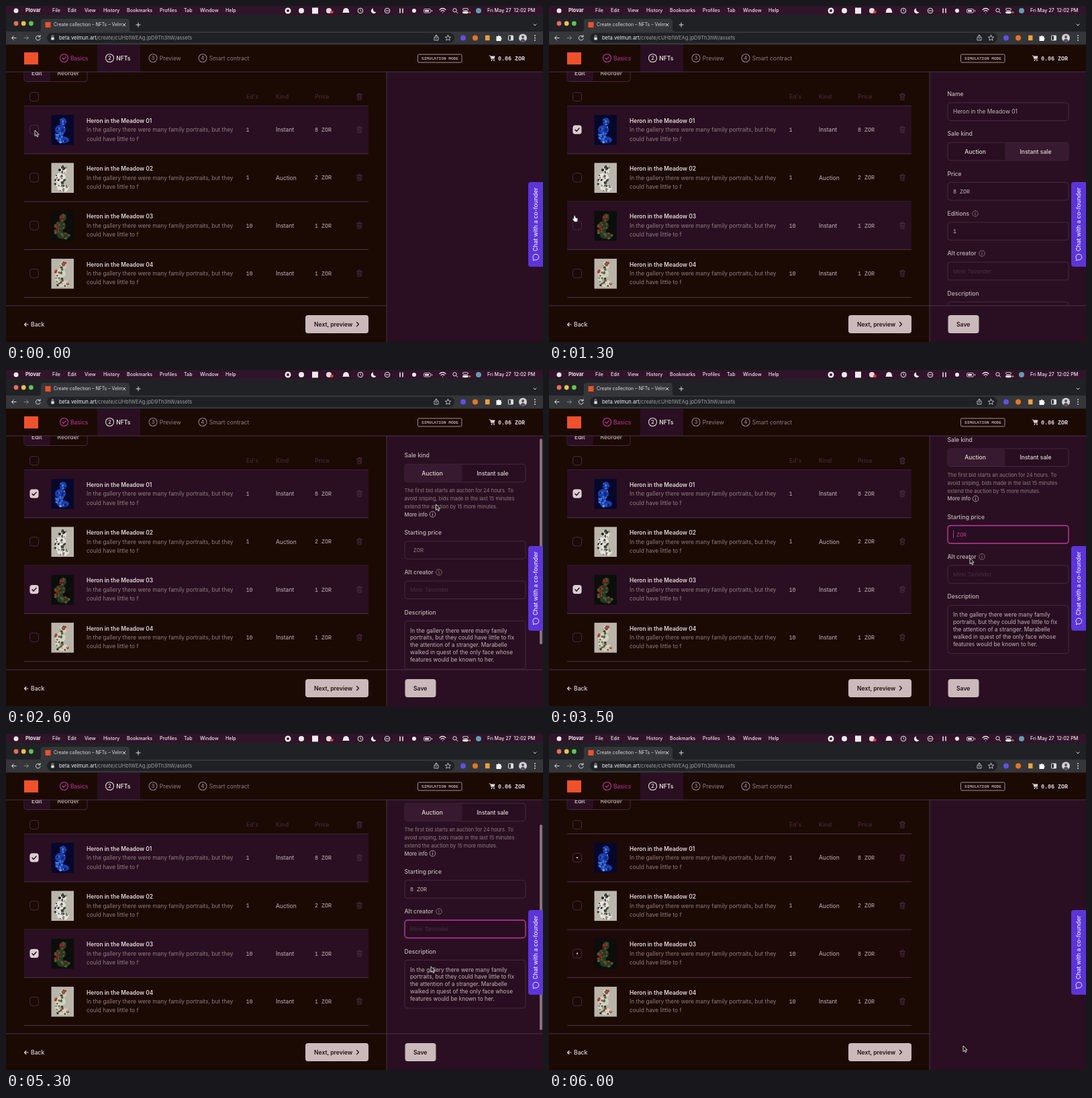
An HTML page that plays this animation: 800 by 500 pixels, repeating every 6.1 s.

```html
<!DOCTYPE html>
<html lang="en">
<head>
<meta charset="utf-8">
<title>Collection editor</title>
<style>
html, body { margin: 0; width: 100%; height: 100%; overflow: hidden; background: #1b0904; }
svg { display: block; width: 800px; height: 500px; }
text { font-family: Inter, sans-serif; white-space: pre; }
.mono { font-family: "Liberation Mono", monospace; }
</style>
</head>
<body>
<svg id="stage" viewBox="0 0 800 500" xmlns="http://www.w3.org/2000/svg"></svg>
<script>
const LOOP = 6100, STEP = 100, COIN = 'ZOR';
const C = {
  page: '#1b0904', plum: '#2a0f22', lift: '#371a2f', line: '#4d3349', edge: '#46293f',
  white: '#e4d7d9', soft: '#c5b5b8', grey: '#907d7f', dim: '#40272f', pink: '#c2389f',
  button: '#cbb9bb', orange: '#f0512d', ui: '#dcdde0'
};

// Drawing helpers, each returning SVG markup
const text = (x, y, str, fill = C.white, size = 8.4, weight = 400, extra = '') =>
  `<text x="${x}" y="${y}" fill="${fill}" font-size="${size}" font-weight="${weight}" ${extra}>${str}</text>`;
const mono = (x, y, str, fill = C.soft, size = 8.33, weight = 400) =>
  text(x, y, str, fill, size, weight, 'class="mono"');
const rect = (x, y, w, h, fill, r = 0, extra = '') =>
  `<rect x="${x}" y="${y}" width="${w}" height="${h}" rx="${r}" fill="${fill}" ${extra}/>`;
const box = (x, y, w, h, color, r = 4, width = 1) =>
  rect(x, y, w, h, 'none', r, `stroke="${color}" stroke-width="${width}"`);
const dot = (x, y, r, fill) => `<circle cx="${x}" cy="${y}" r="${r}" fill="${fill}"/>`;
const ring = (x, y, r, color, width = 1) =>
  `<circle cx="${x}" cy="${y}" r="${r}" fill="none" stroke="${color}" stroke-width="${width}"/>`;
const line = (d, color, width = 1) =>
  `<path d="${d}" fill="none" stroke="${color}" stroke-width="${width}" stroke-linecap="round" stroke-linejoin="round"/>`;
const shape = (d, fill) => `<path d="${d}" fill="${fill}"/>`;
const group = (content, attrs = '') => `<g ${attrs}>${content}</g>`;
const info = (x, y, color = C.grey) =>
  ring(x, y, 4.3, color, .8) + line(`M${x} ${y - .4}v2.4M${x} ${y - 2.1}v.1`, color, .9);
const trash = (x, y, color) =>
  line(`M${x - 4} ${y - 3}h8M${x - 1.5} ${y - 3}v-1.6h3v1.6M${x - 3} ${y - 3}l.5 7.5h5l.5-7.5M${x - 1} ${y - 1}v3.5M${x + 1} ${y - 1}v3.5`, color, .9);

function random(seed) {
  return () => (seed = (seed * 16807) % 2147483647) / 2147483647;
}

const ROW_TOP = 148.5, ROW_H = 71.3;
const items = [
  { eds: 1, kind: 'Instant', price: 8, tones: ['#06082b', '#1c3fae', '#3c74dc', '#101d63', '#6c9bea'] },
  { eds: 1, kind: 'Auction', price: 2, tones: ['#bab6ab', '#e6e3dc', '#3b453a', '#88877c', '#231d21'] },
  { eds: 10, kind: 'Instant', price: 1, tones: ['#0b0e0a', '#243c21', '#a52622', '#45603c', '#611a1b'] },
  { eds: 10, kind: 'Instant', price: 1, tones: ['#b9b5a8', '#d4d0c1', '#48703f', '#a2443c', '#2d4529'] }
];

// Bust-like cluster of soft blobs on a plain ground
function thumbnail(y, tones, seed) {
  const rnd = random(seed * 7919 + 11);
  const parts = [[85, 10, 5, 6], [81, 22, 8, 7], [79, 30, 6, 6], [85, 37, 9, 5]];
  let out = rect(67.5, y, 33.5, 44.5, tones[0]);
  for (const [x, dy, rx, ry] of parts) {
    out += `<ellipse cx="${x}" cy="${y + dy}" rx="${rx}" ry="${ry}" fill="${tones[1]}"/>`;
    for (let i = 0; i < 14; i++) {
      const a = rnd() * 6.28, d = Math.sqrt(rnd());
      out += dot((x + Math.cos(a) * rx * d).toFixed(1), (y + dy + Math.sin(a) * ry * d).toFixed(1),
        (.7 + rnd() * 1.4).toFixed(1), tones[1 + Math.floor(rnd() * 4)]);
    }
  }
  return out;
}

const thumbs = items.map((item, i) => thumbnail(ROW_TOP + ROW_H * i + 13.7, item.tones, i + 1));

function browser() {
  const m = '#f1e9ee', u = C.ui;
  let out = rect(0, 0, 800, 14, '#30142a') + rect(0, 13.5, 800, 25, '#202124') + rect(0, 38, 800, 19.5, '#35363a');
  // Menu bar
  out += dot(15, 7, 3.5, m) + text(29, 9.3, 'Plovar', m, 7.4, 700);
  const menus = [[69, 'File'], [92, 'Edit'], [117, 'View'], [145, 'History'], [180, 'Bookmarks'],
    [229, 'Profiles'], [265, 'Tab'], [289, 'Window'], [327, 'Help']];
  for (const [x, label] of menus) out += text(x, 9.3, label, m, 7.1, 500);
  out += dot(420, 7, 4.5, m) + rect(418.3, 5.3, 3.4, 3.4, '#30142a', .5) + dot(440, 7, 4, m) +
    rect(456, 2.5, 9, 9, m) + dot(481, 7, 4, '#e8d8dc') + dot(485.5, 9, 2.3, '#e33b35') +
    shape('M502 9q0-6 4.5-6t4.5 6l1 1h-11z', m) + ring(528, 7, 3.8, m) + line('M528 5v2l1.5 1', m, .8) +
    shape('M547 3.3a4 4 0 1 0 4.5 5.5a4 4 0 0 1-4.5-5.5z', m) + ring(568, 7, 3.8, m) + line('M566 7h4', m) +
    line('M587 4v6M591 4v6', m, 1.5) + dot(608, 7, 3, m) +
    box(622.5, 4.5, 10, 5.5, m, 1.5, .8) + rect(624, 6, 6, 2.5, m) + line('M634.5 6.5v1.5', m) +
    line('M646 5.5q4.5-4 9 0M648 7.7q2.5-2 5 0M650.5 10h.1', m, 1.2) +
    ring(668.5, 6.3, 2.7, m) + line('M670.7 8.5l2 2', m) +
    box(680.5, 3.5, 8, 3, m, 1.5, .8) + rect(680, 7.7, 9, 3.6, m, 1.8) + dot(691, 9.5, 1.3, '#e4863b') + dot(704, 7, 4, '#5e9fb0');
  out += text(717, 9.3, 'Fri May 27  12:02 PM', m, 7.2, 500);
  // Tab strip
  out += dot(15, 26, 3.4, '#ee6a5f') + dot(26.2, 26, 3.4, '#f5bd4f') + dot(37.4, 26, 3.4, '#61c454') +
    shape('M48 38q4 0 4-4v-11q0-4 4-4h124q4 0 4 4v11q0 4 4 4z', '#35363a') +
    rect(58.5, 24, 8, 8, C.orange) +
    group(text(71, 30.4, 'Create collection – NFTs – Velm', u, 6.9), 'clip-path="url(#tab)"') +
    line('M174 26l4 4M178 26l-4 4', u) + line('M194 28h6M197 25v6', u) + line('M786 27l2 2l2-2', u);
  // Toolbar
  out += line('M15 47.5h-6.5l3-3M8.5 47.5l3 3', u) + line('M27 47.5h6.5l-3-3M33.5 47.5l-3 3', '#85868a') +
    line('M50.5 45.5a3.4 3.4 0 1 0 .6 3M51 43.5v2.5h-2.5', u) + rect(61, 40, 607, 15, '#202124', 7.5) +
    rect(67.3, 46.5, 4.4, 4, u, .6) + line('M68.3 46v-1.3a1.2 1.2 0 0 1 2.4 0V46', u, .8) +
    text(79, 50.1, 'beta.velmun.art<tspan fill="#9d9fa4">/create/cUHb1WEAg.jpD9Th3hW/assets</tspan>', '#eff0f2', 7.55) +
    line('M639.5 46h-1.5v5h6v-5h-1.5M641 49v-6l-1.5 1.5M641 43l1.5 1.5', u, .8) +
    line('M658.5 43.3l1.2 2.7 3 .3-2.2 2 .6 2.9-2.6-1.5-2.6 1.5.6-2.9-2.2-2 3-.3z', u, .8) +
    dot(681, 47.5, 4, '#6050e8') + dot(699, 47.5, 4, '#e27625') + rect(714, 43.7, 6.5, 7.5, '#f0a23a') +
    shape('M730.5 45h2.3a1.4 1.4 0 0 1 2.7 0h2v2.3a1.4 1.4 0 0 1 0 2.7v2h-7z', '#fff') +
    box(748.5, 44, 7, 7, u, .8) + rect(752, 44, 3.5, 7, u) +
    dot(770, 47.5, 6, '#d4d2d8') + dot(770, 46, 2, '#52505a') + shape('M766 52q4-7 8 0q-4 3-8 0z', '#52505a') +
    [44, 47.5, 51].map(y => dot(788, y, .9, u)).join('');
  return out;
}

function header() {
  let out = rect(0, 57.5, 800, 40.5, C.page) + rect(136, 57.5, 64, 40.5, C.plum) + rect(0, 97.5, 800, 1, C.line) +
    rect(27, 69, 21, 18, C.orange);
  out += ring(86.5, 77.5, 6, C.pink, 1.1) + line('M84 77.5l1.8 1.9 3.4-3.8', C.pink, 1.1) + text(96, 80.6, 'Basics', C.pink, 8.5);
  const steps = [[154.5, 2, 'NFTs', C.white, 600], [219, 3, 'Preview', C.grey, 400], [293, 4, 'Smart contract', C.grey, 400]];
  for (const [x, n, label, color, weight] of steps)
    out += ring(x, 77.5, 6, color, 1.1) + text(x, 80.3, n, color, 7.3, 600, 'text-anchor="middle"') +
      text(x + 9.8, 80.6, label, color, 8.5, weight);
  out += box(613.5, 72, 65.5, 12, '#a18f94', 1.5) + mono(619, 80, 'SIMULATION MODE', '#b5a4a8', 6.1, 700) +
    line('M720 74h1.5l1.5 5h4.5', C.white, .9) + shape('M721.7 74.5h6.8l-1 3.7h-4.8z', C.white) +
    dot(723.5, 81, .9, C.white) + dot(727, 81, .9, C.white) + mono(733, 80.6, '0.06 ' + COIN, C.white, 8.33, 700);
  return out;
}

function tableHead() {
  return box(27, 88, 94, 24.5, C.edge) + rect(27.5, 88, 38.5, 24, C.plum, 3) +
    text(38, 102.8, 'Edit', C.white, 8.6, 500) + text(76.5, 102.8, 'Reorder', C.soft, 8.6, 500) +
    box(35.5, 128.5, 13, 13, C.edge, 3.5) + text(358, 138, "Ed's", C.dim, 8.7, 600) +
    text(402, 138, 'Kind', C.dim, 8.7, 600) + text(460, 138, 'Price', C.dim, 8.7, 600) + trash(526.5, 135, C.line);
}

function footer() {
  return rect(0, 445.5, 567, 1, C.line) + line('M33 474h-5.5l2.5-2.5M27.5 474l2.5 2.5', C.white, 1.1) +
    text(37, 476.8, 'Back', C.white, 8.6, 500) + rect(446, 460, 94, 27, C.button, 4) +
    text(459, 476.5, 'Next, preview', '#241014', 8.6, 600) + line('M522.5 470.5l3 3-3 3', '#241014', 1.3);
}

function chat() {
  return shape('M800 262h-18q-4 0-4 4v118q0 4 4 4h18z', '#5c35d8') +
    text(0, 0, 'Chat with a co-founder', '#f0eaff', 8.6, 500, 'transform="translate(792 365) rotate(-90)"') +
    line('M785.5 378.5l.3-2.2a4.4 4.4 0 1 1 2.3 1.6z', '#f0eaff', 1);
}

const ramp = (t, a, b) => Math.min(1, Math.max(0, (t - a) / (b - a)));
const smooth = k => k * k * (3 - 2 * k);

// Pointer path: time, x, y
const path = [[0, 43, 185], [300, 41, 183], [800, 41, 184], [1300, 38, 312], [1400, 40, 322], [1600, 41, 322],
  [1900, 643, 157], [2300, 643, 158], [2900, 638, 242], [3300, 636, 244], [3500, 627, 280], [3800, 627, 285],
  [4300, 629, 303], [4600, 629, 304], [4800, 631, 326], [5300, 633, 346], [5400, 633, 350], [5700, 617, 469],
  [5800, 617, 469], [6000, 617, 464], [6100, 617, 464]];

function pointer(t) {
  const i = Math.max(1, path.findIndex(p => p[0] >= t));
  const [a, ax, ay] = path[i - 1], [b, bx, by] = path[i];
  const k = smooth(ramp(t, a, b));
  return [ax + (bx - ax) * k, ay + (by - ay) * k];
}

const scrollAt = t => 27.5 * smooth(ramp(t, 2500, 2900)) + 13.8 * smooth(ramp(t, 4900, 5300));
const between = (t, a, b) => t >= a && t < b;

function cursor(t, [x, y]) {
  const hand = between(t, 100, 900) || between(t, 1300, 1700) || between(t, 1900, 2400) || between(t, 5700, 5900);
  const beam = between(t, 2900, 3400) || between(t, 4200, 4700);
  const at = `transform="translate(${x.toFixed(1)} ${y.toFixed(1)})"`;
  if (beam) return group(line('M-1.5-4q1.5 0 1.5 1v6q0 1-1.5 1M1.5-4q-1.5 0-1.5 1M0 3q0 1 1.5 1', '#ddd', .9), at);
  const d = hand
    ? 'M-.8 0q1-1 1.8.4l.8 2.7 2 .3 1.3 1-.4 3-1 1.8h-3.7l-2-2.3-1.4-2.1q.6-1.2 2 .2z'
    : 'M0 0v8.6l2-1.9 1.4 3.1 1.5-.7-1.4-3h2.7z';
  return group(`<path d="${d}" fill="${hand ? '#fff' : '#111'}" stroke="${hand ? '#222' : '#fff'}" stroke-width=".8"/>`, at);
}

function checkbox(x, y, on) {
  const mark = rect(-6.5, -6.5, 13, 13, '#ddcdd2', 3.5) + line('M-3 .2l2 2.2 4-4.4', '#2a0f22', 1.5);
  return box(x - 6.5, y - 6.5, 13, 13, C.edge, 3.5) +
    (on ? group(mark, `transform="translate(${x} ${y}) scale(${on.toFixed(2)})"`) : '');
}

function rows(t, [px, py]) {
  const clear = 1 - ramp(t, 5750, 6050), saved = t >= 5800;
  const hover = px < 540 ? Math.floor((py - ROW_TOP) / ROW_H) : -1;
  let out = rect(27, 148, 513, 1, C.line);
  items.forEach((item, i) => {
    const top = ROW_TOP + ROW_H * i, mid = top + 35.5, picked = i === 0 || i === 2;
    const on = i === 0 ? ramp(t, 350, 550) * clear : i === 2 ? ramp(t, 1350, 1550) * clear : 0;
    const glow = hover === i ? 1 : on;
    if (glow) out += rect(27, top, 513, ROW_H, C.plum, 0, `opacity="${glow.toFixed(2)}"`);
    out += rect(27, top + ROW_H - .5, 513, 1, C.line) + checkbox(42, mid, on) + thumbs[i] +
      text(120, mid - 10.2, 'Heron in the Meadow 0' + (i + 1), C.white, 8.4, 600) +
      text(120, mid + 3.3, 'In the gallery there were many family portraits, but they', C.grey) +
      text(120, mid + 16.5, 'could have little to f', C.grey) +
      mono(357.5, mid + 3, item.eds) +
      text(402, mid + 3.2, picked && saved ? 'Auction' : item.kind, C.soft, 8.5) +
      mono(460, mid + 3, `${i === 2 && saved ? 8 : item.price} ${COIN}`) + trash(526.5, mid, C.line);
  });
  return out;
}

const label = (y, str, infoX) => text(593.5, y + 3, str, C.soft, 8.6, 500) + (infoX ? info(infoX, y) : '');
const input = (y, content = '', focus = false) =>
  rect(594, y + 13, 180, 26.5, '#280e20', 4, `stroke="${focus ? C.pink : C.edge}" stroke-width="${focus ? 1.4 : 1}"`) + content;

function segments(y, active) {
  let out = input(y);
  if (active) out += rect(active === 1 ? 594.5 : 679, y + 13.5, active === 1 ? 85 : 94.5, 25.5, C.lift, 3.5);
  return out + text(635, y + 29.3, 'Auction', C.white, 8.6, 500, 'text-anchor="middle"') +
    text(725, y + 29.3, 'Instant sale', C.white, 8.6, 500, 'text-anchor="middle"');
}

const altCreator = (y, focus) =>
  label(y, 'Alt creator', 645) + input(y, text(602, y + 29.3, 'Mirel Tavonder', '#4b2f43', 8.2), focus);

const about = ['In the gallery there were many family', 'portraits, but they could have little to fix',
  'the attention of a stranger. Marabelle', 'walked in quest of the only face whose', 'features would be known to her.'];
const description = y => label(y, 'Description') + rect(594, y + 13, 180, 71.5, '#280e20', 4, `stroke="${C.edge}"`) +
  about.map((s, i) => text(602, y + 30 + i * 10.8, s, C.soft, 8.3)).join('');

function singleForm() {
  const y = i => 131 + 59.3 * i;
  return label(y(0), 'Name') + input(y(0), text(602, y(0) + 29.3, 'Heron in the Meadow 01', C.soft)) +
    label(y(1), 'Sale kind') + segments(y(1), 2) +
    label(y(2), 'Price') + input(y(2), mono(602, y(2) + 29, '8 ' + COIN)) +
    label(y(3), 'Editions', 635) + input(y(3), mono(602, y(3) + 29, '1')) +
    altCreator(y(4)) + description(y(5));
}

function multiForm() {
  return label(131, 'Sale kind') + segments(131, 0) + label(190.3, 'Price') +
    input(190.3, mono(607, 219.5, COIN, C.grey)) + altCreator(249.8) + description(309.3);
}

function auctionForm(t) {
  const y = 131.5 - scrollAt(t), focus = between(t, 3100, 4400), typed = t >= 3900;
  const help = ['The first bid starts an auction for 24 hours. To', 'avoid sniping, bids made in the last 15 minutes',
    'extend the auction by 15 more minutes.'];
  const tone = focus ? C.pink : typed ? C.soft : C.grey;
  const price = (typed ? mono(602, y + 143.5, '8 ' + COIN, tone) : mono(607, y + 143.5, COIN, tone)) +
    (focus ? rect(typed ? 607 : 602, y + 134.5, .9, 12, C.pink) : '');
  return label(y, 'Sale kind') + segments(y, 1) +
    help.map((s, i) => text(593.5, y + 55.2 + i * 11.7, s, C.grey, 7.5)).join('') +
    text(593.5, y + 90.3, 'More info', C.soft, 7.6, 500) + info(635.5, y + 87.5, C.soft) +
    label(y + 114.5, 'Starting price') + input(y + 114.5, price, focus) +
    altCreator(y + 173.8, t >= 4400) + description(y + 233.3);
}

function panel(t) {
  let out = rect(567, 98, 233, 402, C.plum) + rect(566.5, 98, 1, 402, C.line);
  if (!between(t, 500, 5800)) return out;
  const form = t < 1500 ? singleForm() : t < 2200 ? multiForm() : auctionForm(t);
  out += group(form, 'clip-path="url(#form)"');
  if (between(t, 2500, 3300) || between(t, 4900, 5700))
    out += rect(795, 98.5 + scrollAt(t) * .88, 4, 306, '#87737f', 2);
  return out + rect(567, 445.5, 233, 1, C.line) + rect(594.5, 460, 46, 27, C.button, 4) +
    text(607, 476.5, 'Save', '#241014', 8.6, 600);
}

document.getElementById('stage').innerHTML =
  `<defs><clipPath id="form"><rect x="567" y="98" width="233" height="347.5"/></clipPath>
  <clipPath id="tab"><rect x="70" y="18" width="103" height="20"/></clipPath></defs>` +
  rect(0, 0, 800, 500, C.page) + tableHead() + group('', 'id="rows"') + footer() + group('', 'id="panel"') +
  header() + browser() + chat() + group('', 'id="cursor"');

const layers = ['rows', 'panel', 'cursor'].map(id => document.getElementById(id));
let shown = -1;

function draw(now) {
  const t = Math.floor((now % LOOP) / STEP) * STEP;
  if (t !== shown) {
    shown = t;
    const at = pointer(t);
    layers[0].innerHTML = rows(t, at);
    layers[1].innerHTML = panel(t);
    layers[2].innerHTML = cursor(t, at);
  }
}

const start = performance.now();
function tick() {
  draw(performance.now() - start);
  requestAnimationFrame(tick);
}
tick();
</script>
</body>
</html>
```
